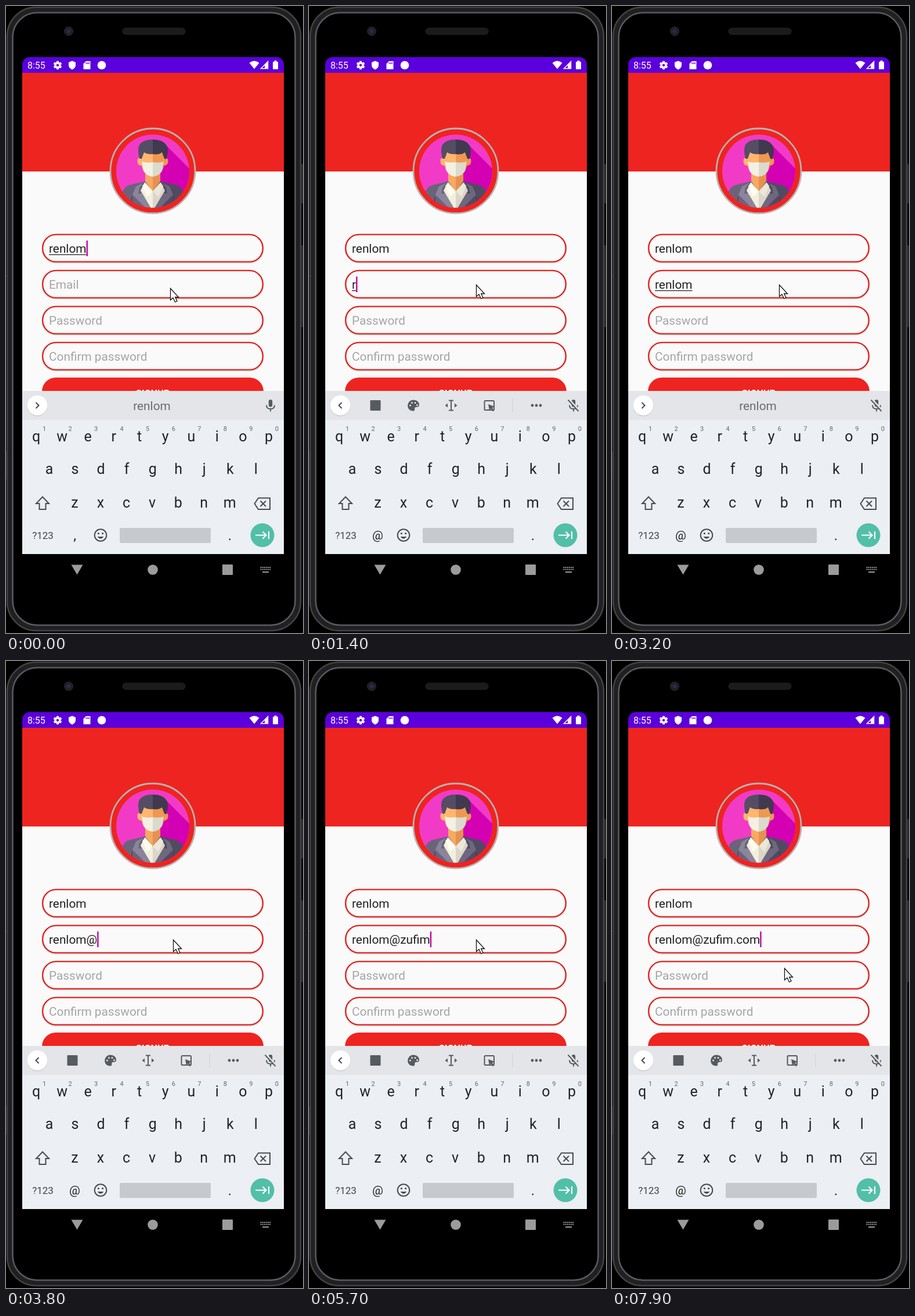
These frames come from a looping animation (512x1080 px, 8 s). An HTML page with a canvas:

```html
<!DOCTYPE html>
<html lang="en">
<head>
<meta charset="utf-8">
<title>Sign-up form</title>
<style>
html, body { margin: 0; width: 100%; height: 100%; overflow: hidden; background: #000; }
canvas { display: block; width: 512px; height: 1080px; }
</style>
</head>
<body>
<canvas id="stage"></canvas>
<script>
const LOOP = 8000;
const USER = 'renlom';
const EMAIL = USER + '@zufim.com';
const KEY_TIMES = [1300, 1700, 1900, 2200, 2400, 2700, 3500, 4600, 4800, 5000, 5200, 5500, 6100, 6400, 6600, 6800];
const FOCUS = 500;
const RED = '#ee2420', GREY = '#565b60', INK = '#202426';
const FONT = 'Roboto, "Noto Sans", sans-serif';

const canvas = document.getElementById('stage');
const dpr = window.devicePixelRatio || 1;
canvas.width = 512 * dpr;
canvas.height = 1080 * dpr;
const c = canvas.getContext('2d');
c.scale(dpr, dpr);

function paint(fill, stroke, width = 2) {
  if (fill) { c.fillStyle = fill; c.fill(); }
  if (stroke) { c.strokeStyle = stroke; c.lineWidth = width; c.stroke(); }
}
function box(x, y, w, h, r, fill, stroke, width) {
  c.beginPath();
  c.roundRect(x, y, w, h, r);
  paint(fill, stroke, width);
}
function disc(x, y, r, fill, stroke, width) {
  c.beginPath();
  c.arc(x, y, r, 0, Math.PI * 2);
  paint(fill, stroke, width);
}
function shape(d, fill, stroke, width, x = 0, y = 0) {
  c.save();
  c.translate(x, y);
  const p = new Path2D(d);
  if (fill) { c.fillStyle = fill; c.fill(p); }
  if (stroke) { c.strokeStyle = stroke; c.lineWidth = width || 2; c.stroke(p); }
  c.restore();
}
function text(s, x, y, size, color, align = 'left', weight = 400) {
  c.font = `${weight} ${size}px ${FONT}`;
  c.textAlign = align;
  c.fillStyle = color;
  c.fillText(s, x, y);
}

function drawPhone() {
  c.fillStyle = '#000';
  c.fillRect(0, 0, 512, 1080);
  for (const [x, y, h] of [[508, 272, 68], [508, 412, 141], [0, 464, 3], [0, 767, 49]])
    box(x, y, x ? 4 : 2, h, 1, '#29292b');
  box(2, 2, 506, 1074, 50, '#202023', '#434347', 2.5);
  box(11.5, 11.5, 487, 1055, 42, '#000', '#5b5b61', 2.5);
  box(201, 38, 108, 11, 5.5, '#1b1b1b', '#242424', 1);
  disc(108, 43.5, 7.5, '#202024', '#2b2b2e', 1);
  disc(108, 43.5, 3.5, '#252c51');
  const nav = '#9b9b9b';
  shape('M112.500 962.500H132.500L122.500 979.500Z', nav);
  disc(253, 971, 8.8, nav);
  box(373, 962, 18, 18, 1, nav);
  for (let i = 0; i < 6; i++)
    for (let j = 0; j < 2; j++) box(438.5 + i * 3.1, 966 + j * 3.5, 2, 2, 0, nav);
  box(442, 974, 11, 2, 0, nav);
}

function drawStatusBar() {
  box(28, 88, 451, 27, [13, 13, 0, 0], '#5b00dc');
  text('8:55', 37, 108, 16, '#fff');
  for (let i = 0; i < 6; i++) {
    c.save();
    c.translate(89, 102);
    c.rotate(i * Math.PI / 3);
    box(-2, -7.3, 4, 4, 0.5, '#fff');
    c.restore();
  }
  disc(89, 102, 3.9, null, '#fff', 3.4);
  shape('M114 94.500L120 97V102C120 105.500 117 108.500 114 109.500C111 108.500 108 105.500 108 102V97Z', '#fff');
  shape('M138 95H145.500V109H133.500V99.500Z', '#fff');
  for (let i = 0; i < 3; i++) box(137.5 + i * 2.5, 97, 1.3, 3, 0, '#5b00dc');
  disc(165, 102, 7.3, '#fff');
  shape('M419.500 98Q428 91 436.500 98L428 108.500Z', '#fff');
  shape('M451.500 95.500V107.700H439.500Z', null, '#fff', 1.5);
  shape('M446 101L451 96V107H446Z', '#fff');
  box(460, 96, 9, 13, 1, '#fff');
  box(462.5, 94, 4, 3, 0, '#fff');
}

function drawAvatar() {
  disc(253, 284, 73, RED, '#b9b3b3', 2.8);
  c.save();
  c.beginPath();
  c.arc(253, 284.5, 63, 0, Math.PI * 2);
  c.clip();
  c.fillStyle = '#f13bc6';
  c.fillRect(190, 221, 127, 127);
  shape('M271 235L330 294V350H270L262 292Z', '#d400b3');
  // neck and face, lit from the left
  shape('M240 282H253V324L240 310Z', '#f6a961');
  shape('M253 282H266V310L253 324Z', '#e79150');
  shape('M232 248H253V293Q236 290 234 275Q226 275 226.500 266Q227 261 231 262Z', '#ffb66f');
  shape('M253 248H273L274 262Q280 261 279.500 268Q279 275 272 275Q270 290 253 293Z', '#ee9852');
  shape('M230 263Q226 246 230 239Q236 230 253 230V255Q244 256 238 252L234 263Z', '#544d63');
  shape('M253 230Q270 230 276 239Q282 247 276 264L273 263L269 252Q263 257 253 255Z', '#403950');
  shape('M234 268Q243 271 253 269V294Q242 293 237 284Z', '#f3f0e4');
  shape('M253 269Q263 271 272 268L269 284Q264 293 253 294Z', '#dcdacb');
  // jacket and shirt
  shape('M200 348V325Q201 312 214 308L240 302L253 320V348Z', '#69647a');
  shape('M306 348V325Q305 312 292 308L266 302L253 320V348Z', '#514b62');
  shape('M239 304L253 320V348H249L232 318Z', '#f2efdf');
  shape('M267 304L253 320V348H257L274 318Z', '#dad7c8');
  shape('M240 304L253 319L243 329L235 310Z', '#fffbed');
  shape('M266 304L253 319L263 329L271 310Z', '#ebe7d9');
  shape('M236 305L230 313L228 323L235 323L250 348H241L218 325L224 311Z', '#8b859b');
  shape('M270 305L276 313L278 323L271 323L256 348H265L288 325L282 311Z', '#6e677e');
  shape('M217 329V348M289 329V348', null, '#433d53', 1.3);
  c.restore();
}

function drawField(top, hint, value, composing, caretOn) {
  box(63, top + 2, 380, 47, 23, null, 'rgba(0,0,0,.10)', 3.5);
  box(63.2, top + 0.7, 379.5, 47, 23, '#fafafa', '#df201d', 2.3);
  const base = top + 32;
  text(value || hint, 74, base, 20.8, value ? '#202020' : '#a5a5a5');
  const w = value ? c.measureText(value).width : 0;
  if (composing && w) box(74, base + 2.7, w, 1.3, 0, '#202020');
  if (caretOn) box(74 + w, top + 11, 2.4, 27, 0, '#c4009f');
}

function drawMic(muted) {
  box(452.8, 678, 6.4, 12.5, 3.2, GREY);
  shape('M449 687.500Q449 694 456 694Q463 694 463 687.500M456 694V698.500', null, GREY, 2);
  if (muted) {
    shape('M448 677L466 697', null, '#e3e5e9', 3);
    shape('M446.500 678.500L464.500 698', null, GREY, 2);
  }
}

function drawToolbar() {
  box(105.5, 679, 18, 18, 1, GREY);
  shape('M180 678.500C168 678.500 166 697.500 180 697.500C184 697.500 181 693 183 691.500C186 690 190 692 190 687C190 682 185.500 678.500 180 678.500Z', GREY);
  for (const [x, y] of [[174.5, 688], [177.5, 683.5], [183, 683.5], [186.5, 687.5]]) disc(x, y, 1.5, '#e3e5e9');
  shape('M241 679.500H249M245 679.500V696.500M241 696.500H249', null, GREY, 2);
  shape('M239 684.500V691.500L234.500 688ZM251 684.500V691.500L255.500 688Z', GREY);
  box(302.500, 680, 16.5, 16, 1.5, null, GREY, 2);
  shape('M309 686L320 690L316 692L319 697L317 698.500L313.500 693.500L311 697Z', GREY);
  box(350.5, 676, 1, 24, 0, '#cfd2d6');
  for (const x of [385, 392, 399]) disc(x, 688, 2.4, GREY);
}

function drawKeyboard(suggestion, emailMode) {
  c.fillStyle = '#e3e5e9';
  c.fillRect(28, 663, 451, 50);
  c.fillStyle = '#eceff3';
  c.fillRect(28, 713, 451, 231);

  disc(54, 689, 17.5, 'rgba(0,0,0,.13)');
  disc(54, 688, 17.3, '#fff');
  shape(suggestion ? 'M51.500 683L56.500 688L51.500 693' : 'M56.500 683L51.500 688L56.500 693', null, '#43484c', 2);
  if (suggestion) text(suggestion, 251.5, 696, 20.8, '#686c70', 'center');
  else drawToolbar();
  drawMic(emailMode);

  const step = 44.55;
  const rows = [['qwertyuiop', 52, 750], ['asdfghjkl', 74.5, 806], ['zxcvbnm', 118.5, 864]];
  for (const [keys, x, y] of rows)
    [...keys].forEach((k, i) => text(k, x + i * step, y, 25, INK, 'center'));
  for (let i = 0; i < 10; i++) text((i + 1) % 10, 66 + i * step, 732, 11, '#62676b', 'center');

  shape('M63 845.500L74 857H68.500V867H57.500V857H52Z', null, '#464b50', 2);
  shape('M435 847.500H455V867H435L428.500 857.300ZM438.500 852.500L448 862M448 852.500L438.500 862', null, '#464b50', 2);

  text('?123', 63.5, 917.5, 17, '#3e4347', 'center');
  text(emailMode ? '@' : ',', 118.500, emailMode ? 919 : 919.5, emailMode ? 21 : 24, INK, 'center');
  disc(163, 911.5, 10.3, null, '#464b50', 2);
  disc(159.4, 908.5, 1.6, '#464b50');
  disc(166.6, 908.5, 1.6, '#464b50');
  shape('M157.500 914Q163 921 168.500 914Z', '#464b50');
  box(196, 899, 157, 26, 2, '#c6cacf');
  text('.', 386, 919.5, 24, INK, 'center');
  disc(442, 911.5, 20.5, '#52bfa8');
  shape('M430 911.500H448M442.500 905.500L448.500 911.500L442.500 917.500M453 905V918', null, '#fff', 2.2);
}

function ease(t, from, to) {
  const p = Math.min(1, Math.max(0, (t - from) / (to - from)));
  return p * p * (3 - 2 * p);
}

function drawPointer(t) {
  const a = ease(t, 100, 400), b = ease(t, 7300, 7800);
  shape('M0 0V20L4.500 16L8 23.500L11.500 22L8.200 15H14Z', '#fff', '#111', 1.3,
    283.5 + 5 * a + 9 * b, 486.5 - 6 * a + 49 * b);
}

function draw(t) {
  const typed = KEY_TIMES.filter(k => k <= t).length;
  const inEmail = t >= FOCUS;
  const email = EMAIL.slice(0, typed);
  const lastEdit = typed ? KEY_TIMES[typed - 1] : inEmail ? FOCUS : 0;
  const caretOn = (t - lastEdit) % 1000 < 500;
  const composing = typed > 0 && typed <= USER.length;
  // suggestions appear shortly after the first letter
  const suggestion = !inEmail ? USER : composing && t >= 1500 ? email : '';

  drawPhone();
  c.fillStyle = '#fafafa';
  c.fillRect(28, 115, 451, 548);
  c.fillStyle = RED;
  c.fillRect(28, 115, 451, 170);
  drawStatusBar();
  drawAvatar();
  drawField(393, '', USER, !inEmail, !inEmail && caretOn);
  drawField(455, 'Email', email, composing, inEmail && caretOn);
  drawField(517, 'Password');
  drawField(579, 'Confirm password');
  box(62, 640, 382, 48, 24, RED);
  text('SIGNUP', 253, 672.5, 16.3, '#fff', 'center', 700);
  drawKeyboard(suggestion, inEmail);
  drawPointer(t);
}

const start = performance.now();
function tick() {
  const t = (performance.now() - start) % LOOP;
  draw(Math.floor(t / 100) * 100);
  requestAnimationFrame(tick);
}
tick();
</script>
</body>
</html>
```
